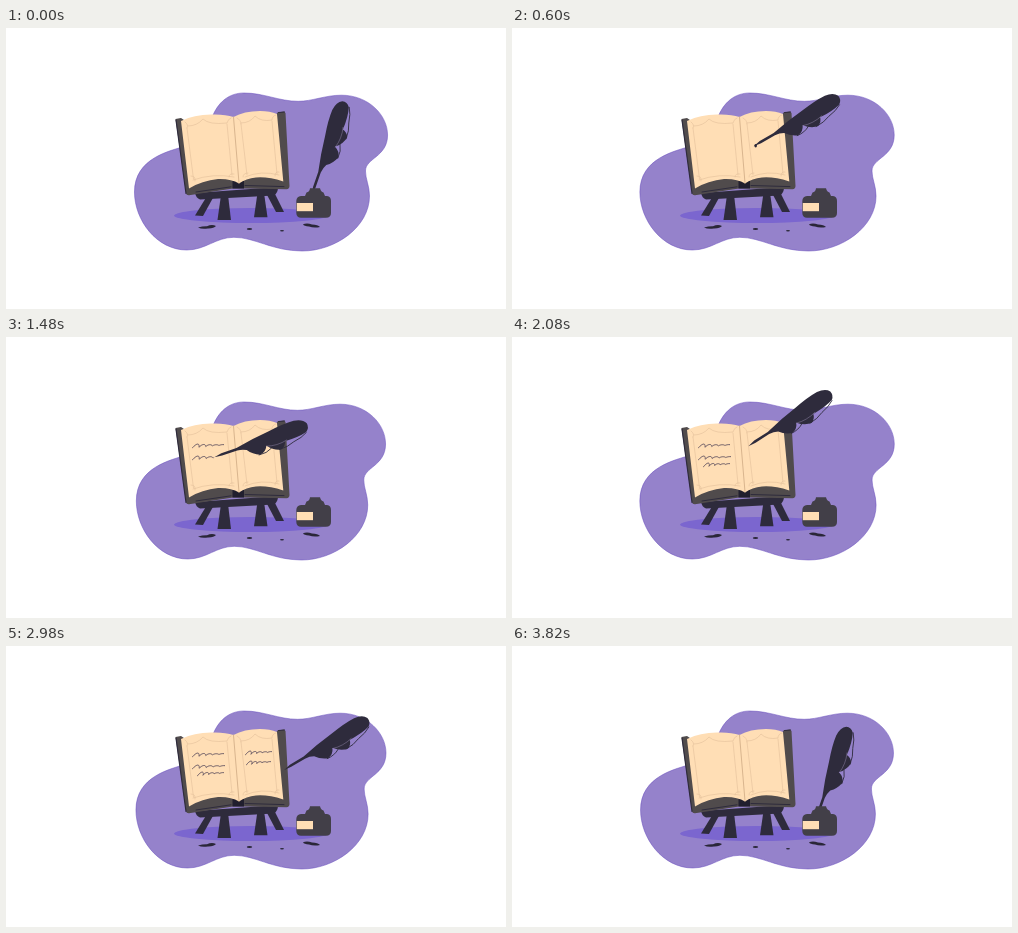
Write an HTML page with a canvas that moves like this. It is 500 by 281 pixels and loops after 3840 ms.

```html
<!DOCTYPE html>
<html lang="en">
<head>
<meta charset="utf-8">
<title>Quill and book</title>
<style>
html, body { margin: 0; width: 100%; height: 100%; overflow: hidden; background: #fff; }
canvas { display: block; width: 500px; height: 281px; }
</style>
</head>
<body>
<canvas id="stage"></canvas>
<script>
const LOOP = 3840;
const canvas = document.getElementById('stage');
const ctx = canvas.getContext('2d');
const ratio = window.devicePixelRatio || 1;
canvas.width = Math.round(500 * ratio);
canvas.height = Math.round(281 * ratio);

const DARK = '#2e2b3c', INK = '#2a2738', COVER = '#504b4c', PAPER = '#ffdeb5', TAN = '#e3c09a';

const clamp = v => Math.max(0, Math.min(1, v));
const mix = (a, b, u) => a + (b - a) * u;
const smooth = u => u * u * (3 - 2 * u);

// A stop is a written line, or a place to wait when its width is 0
const stop = (from, to, x, y, width, tilt, endTilt = tilt) =>
  ({ from, to, x, y, width, tilt, endTilt });
const STOPS = [
  stop(0, 0, 306, 167, 0, 71.5),
  stop(310, 320, 306, 150, 0, 71),
  stop(850, 1030, 188, 109, 29, 36, 30),
  stop(1190, 1620, 188, 121, 30, 25, 17),
  stop(1700, 1930, 193, 128, 24, 28, 35),
  stop(2140, 2420, 241, 107, 24, 35),
  stop(2520, 2800, 242, 117, 22, 33),
  stop(3270, 3300, 306, 150, 0, 71),
  stop(3820, LOOP, 304, 174.5, 0, 71.5)
];

function penAt(t) {
  const i = STOPS.findLastIndex(s => t >= s.from);
  const a = STOPS[i], b = STOPS[i + 1];
  if (t < a.to || !b) {
    const p = clamp((t - a.from) / (a.to - a.from));
    const wobble = a.width ? Math.sin(t / 14) * 0.8 : 0;
    return { x: a.x + a.width * p, y: a.y + wobble, tilt: mix(a.tilt, a.endTilt, p) };
  }
  // Travel in an arc; the feather drops early and rights itself late
  const u = (t - a.to) / (b.from - a.to), x = a.x + a.width;
  const arc = Math.hypot(b.x - x, b.y - a.y) * 0.075 * Math.sin(Math.PI * u);
  const swing = b.tilt > a.endTilt ? u ** 3 : 1 - (1 - u) ** 3;
  return {
    x: mix(x, b.x, smooth(u)),
    y: mix(a.y, b.y, smooth(u)) - arc,
    tilt: mix(a.endTilt, b.tilt, swing) - arc
  };
}

function fill(path, color) {
  ctx.fillStyle = color;
  ctx.fill(new Path2D(path));
}

function line(path, color, width) {
  ctx.strokeStyle = color;
  ctx.lineWidth = width;
  ctx.stroke(new Path2D(path));
}

function oval(x, y, rx, ry, color) {
  ctx.beginPath();
  ctx.ellipse(x, y, rx, ry, 0, 0, 7);
  ctx.fillStyle = color;
  ctx.fill();
}

// The blob breathes sideways around its middle, twice per loop
function drawBlob(t) {
  const sway = Math.sin(t / LOOP * Math.PI * 4 + 0.35) / 80;
  ctx.save();
  ctx.translate(250, 0);
  ctx.scale(1 + sway, 1);
  ctx.translate(-250, 0);
  const shape = 'M206 90C212 74 223 65 238 65C258 65 273 73.3 292 73.3' +
    'C306 73.3 319 67.2 335 67.2C362 67.2 381 87 381 107' +
    'C381 129 359 130 359 143C359 151 363 158 363 168' +
    'C363 199 329 223 296 223C266 223 249 209.3 228 209.3' +
    'C210 209.3 200 222 181 222C151 222 129 192 129 164C129 130 164 123 180 118Z';
  fill(shape, '#9582cb');
  line(shape, 'rgba(104,78,190,.65)', 0.8);
  ctx.restore();
}

function drawStand() {
  oval(245, 187.5, 77, 7.5, '#7b66cf');
  fill('M201 168L208 168L197 188L189 187.5Z', DARK);
  fill('M215 167H222L225 192H211.5Z', DARK);
  fill('M251.5 165H258L261.5 189.3H248Z', DARK);
  fill('M260 165L268 164L278 184H270Z', DARK);
  fill('M189 165L272 159Q272 165 268 167.5L194 171.5Q190 170 189 165Z', DARK);
  fill('M192 199.6Q197 198 201 198.2Q206 196 210 198Q208 200.5 202 200.4Q196 201.5 192 199.6Z', INK);
  oval(243.5, 201, 2.7, 1, INK);
  oval(276, 202.8, 2, 0.8, INK);
  fill('M297 196.3Q301 194.8 306 196.5Q312 196.8 314 199Q308 200.2 303 198.6Q298 198.3 297 196.3Z', INK);
}

function drawBook() {
  fill('M169.5 91L175 90L190 100L265 95L271.5 84.5L278 83.5L279.5 85L283.5 158Q283.5 161 280.5 161.2L238 160.5H227L183 167.3Q180.3 167.5 180 165Z', COVER);
  line('M170 92L180 165.5', DARK, 1.2);
  line('M272.5 84.5L278.5 84', DARK, 1);
  fill('M226.5 153H238V160.5H226.5Z', '#211f2e');
  line('M190 164L225 158.8M239 157.5L278 158.6', DARK, 1);
  fill('M175 93Q188 86.5 205 86.5Q219 86 227.5 89Q238 83 254 83Q264 83 271 86L277.3 153.5Q262 148.5 250 149.5Q240 150.5 233 155.5Q225 150.5 212 151Q196 152.5 183 160.5Z', PAPER);
  line('M227.5 89L233 155', '#d9b58e', 1);

  // Page frames with scalloped corners
  line('M181 100L187.5 151M221 96L226 147M187 152Q207 145 228 149' +
    'M179 94Q183 97 181 100M182 98Q191 98 197 91Q203 97 221 95Q222 91 225 90' +
    'M185 148Q190 148 189 153M223 149Q223 145 228 146', TAN, 0.6);
  line('M235 96L241 147M266 93L271 146M239 149Q255 142 273 147' +
    'M231 90Q235 92 235 96M235 95Q244 95 249 88Q255 94 266 92Q266 88 270 87' +
    'M237 149Q237 145 242 145M269 148Q269 143 273 144', TAN, 0.6);
}

// Slanted cursive that flattens towards the end of each line
function drawWriting(t) {
  ctx.globalAlpha = 1 - clamp((t - 3250) / 250);
  ctx.strokeStyle = '#55485a';
  ctx.lineWidth = 0.9;
  for (const { from, to, x, y, width } of STOPS) {
    if (!width || t < from) continue;
    const done = clamp((t - from) / (to - from));
    ctx.beginPath();
    for (let i = 0; i <= 90 * done; i++) {
      const p = i / 90, wave = p * Math.PI * 9 - 2.6;
      const size = 0.4 + 1.7 * (1 - p) ** 2;
      const up = Math.cos(wave) * size;
      ctx.lineTo(x + width * p + Math.sin(wave) * 0.8 + up * 0.6, y - p - up);
    }
    ctx.stroke();
  }
  ctx.globalAlpha = 1;
}

function drawQuill(t) {
  const { x, y, tilt } = penAt(t);
  ctx.save();
  ctx.translate(x, y);
  ctx.rotate(-tilt * Math.PI / 180);
  fill('M0 0L8 -1.6L24 -1.4Q42 -4.8 60 -6.3Q76 -8.6 87 -7.8Q96 -6.5 98.5 -1Q99.5 4 95 7Q86 9.5 72 8.5Q71 13 66 15Q59 14 53 6.5Q50 12.5 44 13Q37 10 33 4Q29 1.6 24 1.2L8 1Z', DARK);
  line('M64 14.5Q73 15 80 12Q89 11 95 7.5M43 12.8Q51 14 57 10.5', DARK, 0.8);
  line('M53 7Q63 10.5 74 8', 'rgba(190,175,215,.5)', 0.6);
  ctx.restore();
  if (t > 500 && t < 660) oval(x + 2, y - 0.5, 1.3, 1.7, INK);
}

function drawBottle() {
  fill('M304 160.3H314Q315 164 317.5 164.5L319 168H321Q325 168.5 325 173V185Q325 189.8 320 189.8H295Q290.5 189.8 290.3 185V173Q290.5 168.5 295 168H299L300.5 164.5Q303.5 164 304 160.3Z', '#423f48');
  fill('M290.8 175H307V183.2H290.8Z', PAPER);
}

function frame(now) {
  const t = now % LOOP;
  ctx.setTransform(ratio, 0, 0, ratio, 0, 0);
  ctx.fillStyle = '#fff';
  ctx.fillRect(0, 0, 500, 281);
  ctx.lineCap = ctx.lineJoin = 'round';
  drawBlob(t);
  drawStand();
  drawBook();
  drawWriting(t);
  drawQuill(t);
  drawBottle();
}

const start = performance.now();
function tick() {
  frame(Math.max(0, performance.now() - start));
  requestAnimationFrame(tick);
}
tick();
</script>
</body>
</html>
```
